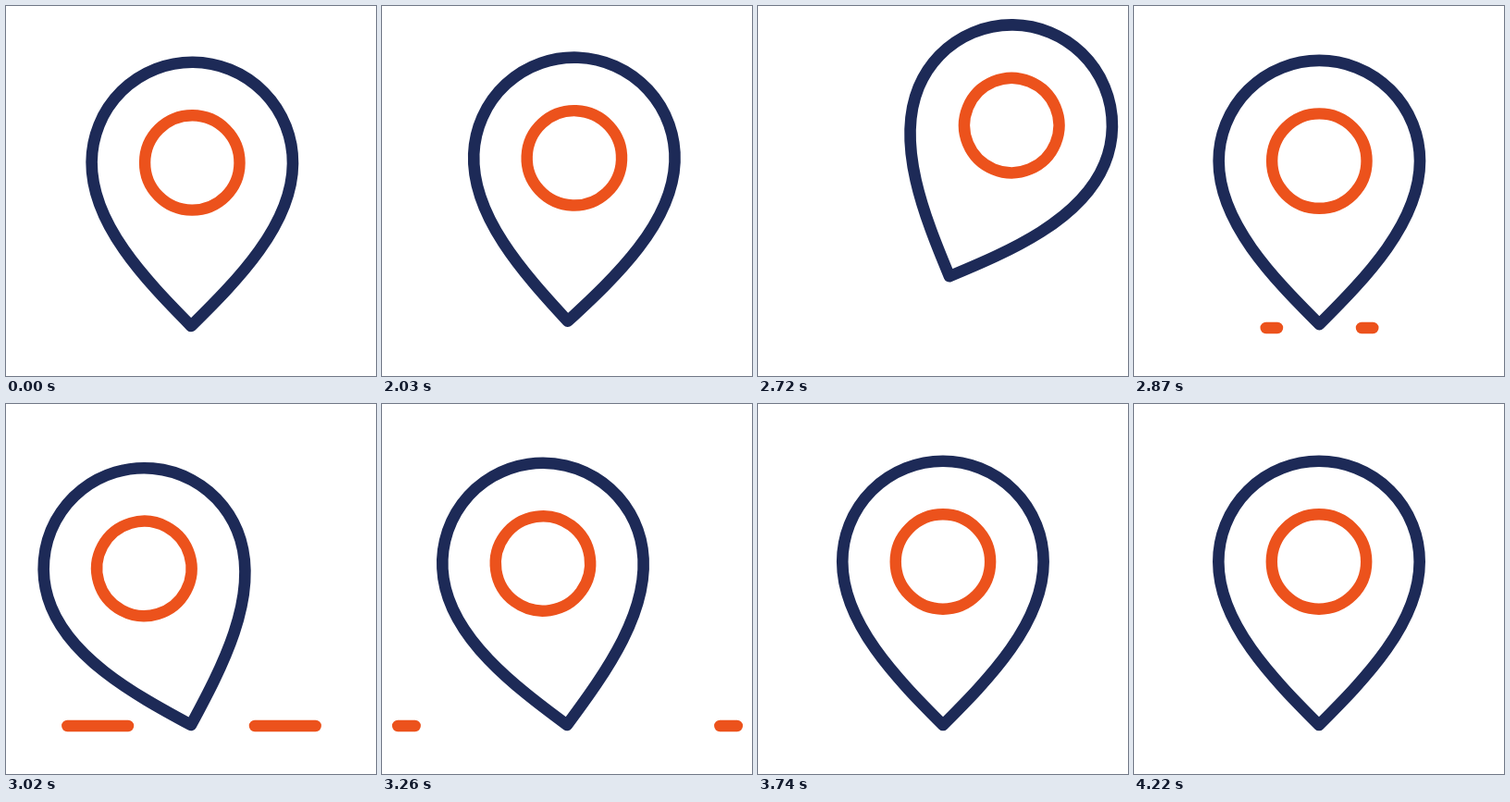
Write an HTML page that moves like this. It is 400 by 400 pixels and loops after 4.25 s.

```html
<!DOCTYPE html>
<html lang="en">
<head>
<meta charset="utf-8">
<title>Map pin</title>
<style>
  html, body { margin: 0; width: 100%; height: 100%; overflow: hidden; background: #fff; }
  svg { display: block; width: 100%; height: 100%; fill: none; stroke-linecap: round; stroke-linejoin: round; }
  .navy { stroke: #1d2a57; stroke-width: 12.6; }
  .orange { stroke: #ec521c; stroke-width: 12.4; }
</style>
</head>
<body>
<svg viewBox="0 0 400 400">
  <path id="dashes" class="orange"/>
  <g id="pin">
    <path class="navy" d="M0 0C-50 -50 -108.7 -110 -108.7 -176.5A108.7 108.7 0 0 1 108.7 -176.5C108.7 -110 50 -50 0 0Z"/>
    <circle class="orange" cy="-176.5" r="51.2"/>
  </g>
</svg>
<script>
  const LOOP = 4250, HOLD = 2000, STEP = 30;
  const PEAK = 20, LAND = 29.2;
  const pin = document.getElementById('pin');
  const dashes = document.getElementById('dashes');

  const clamp = x => Math.min(1, Math.max(0, x));
  const sineOut = x => Math.sin(x * Math.PI / 2);
  const sineInOut = x => (1 - Math.cos(x * Math.PI)) / 2;
  const cubicOut = x => 1 - (1 - x) ** 3;
  const cubicInOut = x => x < 0.5 ? 4 * x ** 3 : 1 - 4 * (1 - x) ** 3;

  // Swing keys: start step, end step, start angle, end angle, easing
  const swings = [
    [-0.2, PEAK, 0, 24.6, sineOut],
    [PEAK, 37, 24.6, -17.6, cubicInOut],
    [37, 49.8, -17.6, 9.9, sineInOut],
    [49.8, 62.6, 9.9, -4, sineInOut],
    [62.6, 74, -4, 0, sineInOut]
  ];

  function angle(n) {
    const [a, b, from, to, ease] = swings.find(s => n <= s[1]) || swings[4];
    return from + (to - from) * ease(clamp((n - a) / (b - a)));
  }

  function lift(n) {
    return n < PEAK
      ? sineOut((n + 0.2) / (PEAK + 0.2))
      : 1 - clamp((n - PEAK) / (LAND - PEAK)) ** 2;
  }

  function reach(n, start) {
    return 45.5 + 143 * cubicOut(clamp((n - start) / 20.3));
  }

  function draw(t) {
    const n = Math.max(0, Math.floor((t - HOLD) / STEP));
    const up = lift(n);
    pin.setAttribute('transform',
      `translate(${200 + 8.6 * up} ${347 - 67.5 * up}) rotate(${angle(n)})`);

    const outer = reach(n, 28.4), inner = reach(n, 32.85);
    dashes.setAttribute('d', outer - inner > 0.1
      ? `M${200.5 - inner} 348H${200.5 - outer}M${200.5 + inner} 348H${200.5 + outer}`
      : '');
  }

  const begin = performance.now();
  function tick() {
    draw((performance.now() - begin) % LOOP);
    requestAnimationFrame(tick);
  }
  tick();
</script>
</body>
</html>
```
